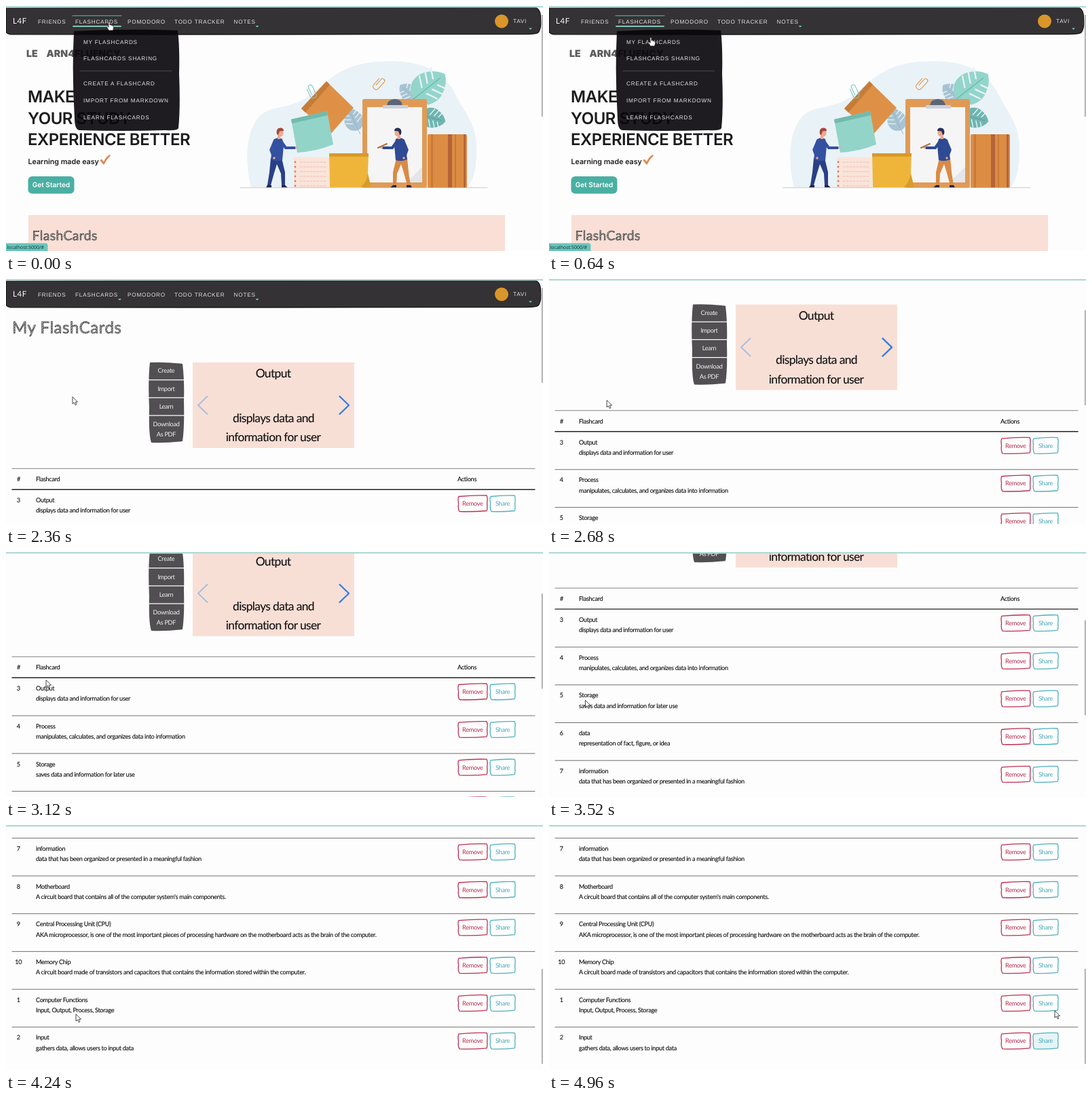
These frames come from a looping animation (791 by 361 pixels, 5 s). An HTML page:

```html
<!DOCTYPE html>
<html lang="en">
<head>
<meta charset="utf-8">
<title>Flashcards</title>
<style>
html, body { margin: 0; width: 100%; height: 100%; overflow: hidden; background: #fefdfd; }
svg { display: block; width: 791px; height: 361px; text-rendering: geometricPrecision; }
.nav { font: 8.2px "Liberation Sans", Arial, sans-serif; letter-spacing: .8px; fill: #e3e2e2; }
.hand { font: 9.2px Lato, sans-serif; letter-spacing: -.035em; fill: #111; stroke: #111; stroke-width: .12; }
.card { font-size: 17.4px; text-anchor: middle; }
.mid { text-anchor: middle; }
.light { fill: #f4f4f4; stroke: none; }
.sketch { font: 24px Lato, sans-serif; letter-spacing: .022em; fill: url(#hatch); stroke: #333; stroke-width: .55; }
.head { font: 600 24px Inter, sans-serif; letter-spacing: -.02em; fill: #1c1c1e; }
.logo { font: 900 14.2px Inter, sans-serif; fill: #5d5c5d; }
</style>
</head>
<body>
<svg id="stage" viewBox="0 0 791 361"></svg>
<script>
const LOOP = 5000, STEP = 40, ROW = 55.7, TABLE = 310.5;

const cards = [
  [3, 'Output', 'displays data and information for user'],
  [4, 'Process', 'manipulates, calculates, and organizes data into information'],
  [5, 'Storage', 'saves data and information for later use'],
  [6, 'data', 'representation of fact, figure, or idea'],
  [7, 'information', 'data that has been organized or presented in a meaningful fashion'],
  [8, 'Motherboard', "A circuit board that contains all of the computer system's main components."],
  [9, 'Central Processing Unit (CPU)', 'AKA microprocessor, is one of the most important pieces of processing hardware on the motherboard acts as the brain of the computer.'],
  [10, 'Memory Chip', 'A circuit board made of transistors and capacitors that contains the information stored within the computer.'],
  [1, 'Computer Functions', 'Input, Output, Process, Storage'],
  [2, 'Input', 'gathers data, allows users to input data']
];

const text = (x, y, s, cls, extra = '') => `<text x="${x}" y="${y}" class="${cls}" ${extra}>${s}</text>`;
const path = (d, fill, stroke = 'none', w = 1, extra = '') =>
  `<path d="${d}" fill="${fill}" stroke="${stroke}" stroke-width="${w}" stroke-linecap="round" stroke-linejoin="round" ${extra}/>`;
const line = (d, stroke, w = 1, extra) => path(d, 'none', stroke, w, extra);
const rect = (x, y, w, h, fill, extra = '') => `<rect x="${x}" y="${y}" width="${w}" height="${h}" fill="${fill}" ${extra}/>`;
const dot = (x, y, r, fill) => `<circle cx="${x}" cy="${y}" r="${r}" fill="${fill}"/>`;
const caret = (x, y) => path(`M${x - 2.5} ${y}h5l-2.5 2.4z`, '#63cfc2');

// Hand-drawn looking box: slightly uneven edges
function wobble(x, y, w, h, color, extra = '') {
  const d = `M${x + 1} ${y + 1.5}Q${x + w / 2} ${y - .6} ${x + w - 1} ${y}Q${x + w + .8} ${y + 3} ${x + w - .4} ${y + h / 2}` +
    `Q${x + w + .4} ${y + h - 3} ${x + w - 1} ${y + h - 1}Q${x + w / 2} ${y + h + .8} ${x + 2} ${y + h}` +
    `Q${x - .6} ${y + h - 4} ${x + .6} ${y + h / 2}Q${x - .8} ${y + 4} ${x + 1} ${y + 1.5}z`;
  return path(d, 'none', color, 1.3, extra);
}

function navbar(open) {
  const items = [[47, 'FRIENDS'], [102, 'FLASHCARDS'], [179, 'POMODORO'], [248, 'TODO TRACKER'], [335.5, 'NOTES']];
  return path('M0 3Q400 1.5 781 2.5Q788 6 787.5 18Q789 33 784 39Q781 42 760 41.5Q400 43 10 42Q2 42 0 38z', '#343234', '#161516', 1.2) +
    text(10, 26.2, 'L4F', 'nav', 'style="font:11.5px Lato,sans-serif;letter-spacing:.6px;fill:#fff"') +
    items.map(([x, s]) => text(x, 25.6, s, 'nav')).join('') +
    text(747, 25.1, 'TAVI', 'nav') + dot(730, 22.5, 10, '#d9962a') +
    (open ? line('M98 14.3H170', '#5fb9ae', 1) + line('M99 29.8H169', '#8ed9cf', 1.8) : caret(167.5, 29)) +
    caret(370, 29) + caret(772.5, 32.5);
}

function leaf(x, y, turn, size, fill, vein) {
  const ribs = [-7, 0, 7].map(v => `M4 ${v - 2}L14 ${v - 7}M-4 ${v - 2}L-14 ${v - 7}`).join('');
  return `<g transform="translate(${x} ${y}) rotate(${turn}) scale(${size})">` +
    path('M0 18C-14 17-18 4-14-6Q-9-17 0-21Q9-17 14-6C18 4 14 17 0 18z', fill) +
    line('M0 25V-15', vein, .8) + line(ribs, '#e9f2f7', 1.5) + '</g>';
}

function clip(x, y, turn, color) {
  return `<g transform="translate(${x} ${y}) rotate(${turn})">` +
    line('M-2 5V-6Q-2-9 1-9Q4-9 4-6V7Q4 11 0 11Q-5 11-5 7V-5', color, 1.1) + '</g>';
}

function man(x, flip, hair, legs, shirt) {
  return `<g transform="translate(${x} 0) scale(${flip} 1)">` +
    path('M-13 224L-15 245L-18 264H-13L-8 246L-4 233L2 247L3 264H8L8 245L3 224z', legs) +
    path('M-18 264H-12V267.5H-20zM3 264H8L12 267.5H3z', '#1c2650') +
    path('M-9 197Q-3 192 4 196L6 206L4 227Q-4 230-13 226z', shirt) +
    line('M2 199L9 209L22 209', shirt, 4) + line('M-8 200L-13 212L-9 223', shirt, 3.6) +
    dot(25, 208.5, 1.8, '#eeaa90') + dot(-8, 224, 1.7, '#eeaa90') +
    path('M-3 186Q-3 181.5 2 181.5Q6 182 5.5 187Q5.5 192 1.5 192L1 196H-3z', '#eeaa90') +
    path('M-4 189Q-6 180 1 179.5Q6 179.5 6 184L0 184.5L-2 190z', hair) + '</g>';
}

function art() {
  let s = path('M361 267C352 235 352 185 373 163C390 145 420 153 447 132C477 108 493 86 548 82C604 78 640 91 660 126C675 158 693 171 693 210C693 238 690 255 680 267z', '#e9f2f7');
  s += leaf(512, 168, -25, .9, '#a8c4d3', '#8fb0c2') + leaf(594, 128, -50, .85, '#a8c4d3', '#8fb0c2');
  s += leaf(622, 120, 52, 1.5, '#93d5ca', '#62b5a9') + leaf(628, 165, 105, .95, '#6fb5b0', '#549d98');
  s += path('M472 111L512 150L477 190L435 151z', '#de9146') + path('M472 111L477 116L441 157L435 151z', '#c67c39');
  s += path('M420 167L473 155L482 204Q458 214 429 216z', '#93d4c8') + path('M420 167L473 155L474 161L421 173z', '#71bbae');
  s += clip(450, 125, -25, '#76c7bb') + clip(550, 114, 42, '#e19750');
  s += rect(525, 137, 95, 131, '#e09a55', 'rx="3"') + rect(532, 149, 81, 111, '#f5f5f5');
  s += path('M590 260L613 237V260z', '#e3e6ea') + path('M555 151V146H592V151z', '#c9d2dc') + path('M561 146Q562 138 573 137Q583 138 584 146z', '#5b6478');
  s += rect(621, 189, 58, 79, '#dc8d43', 'rx="2"') + rect(626, 189, 3, 79, '#c97a38') + rect(651, 189, 6, 79, '#b5633a') + rect(661, 189, 2, 79, '#c97a38') + rect(674, 189, 3, 79, '#b5633a');
  s += rect(424, 223, 52, 45, '#fae4da');
  for (let y = 230; y < 266; y += 7) s += line(`M433 ${y}H471`, '#f0bfae', 1, 'stroke-dasharray="3 2"') + dot(426, y, 1.4, '#d87a63');
  s += path('M476 217H534L533 245Q533 260 538 267H477z', '#efb53b') + path('M476 217H534V222H476z', '#d89a2c') + path('M522 267Q531 260 533 247L538 267z', '#d99b2c');
  s += man(403, 1, '#a8453c', '#2b3f86', '#3450a0') + man(578, -1, '#263258', '#d98a45', '#2f4a94');
  return s + line('M548 209L561 203', '#b96f32', 2) + line('M345 267.7H709', '#b9bcc2', .8);
}

function home() {
  const menu = [[55.6, 'MY FLASHCARDS'], [80.4, 'FLASHCARDS SHARING'], [116.8, 'CREATE A FLASHCARD'], [142, 'IMPORT FROM MARKDOWN'], [166.6, 'LEARN FLASHCARDS']];
  return text(30, 74.5, 'LE', 'logo') + text(59.5, 74.5, 'ARN4FLUENCY', 'logo') +
    text(32, 142, 'MAKE', 'head') + text(32, 173.5, 'YOUR STUDY', 'head') + text(32, 205, 'EXPERIENCE BETTER', 'head') +
    text(32.5, 232.5, 'Learning made easy', 'head', 'style="font-size:10.7px;letter-spacing:0"') +
    path('M138.5 227.5L140.5 225.5L144 229.5Q147 222 153 219L154 220.5Q148 226 144.6 233.5L143.4 233.5z', '#dd8850') +
    rect(32.5, 251, 68, 25.5, '#4aafa3', 'rx="6"') +
    text(66.5, 267.3, 'Get Started', 'head mid', 'style="font-size:10.1px;letter-spacing:0;fill:#fff"') +
    art() + rect(33, 308, 702, 60, '#f9dfd6') +
    text(38.5, 345, 'FlashCards', 'sketch', 'style="font-size:19.3px"') + navbar(true) +
    path('M100 37Q180 33 253 36Q256 60 255 100Q257 150 254 180Q252 184 235 183Q170 185 108 183Q101 182 101 165Q97 100 100 37z', 'rgba(8,6,10,.91)') +
    line('M109 95.8H244', '#5a585b', .8) + menu.map(([y, s]) => text(114, y, s, 'nav')).join('') +
    path('M0 349.5H58Q61.5 349.5 61.5 353V361H0z', '#69c5ba') +
    text(1.5, 358.3, 'localhost:5000/#', '', 'style="font:7px Noto Sans,sans-serif;fill:#173b3a"');
}

function row([n, name, info], i) {
  const y = TABLE + ROW * i, last = i === cards.length - 1;
  const color = (c, id) => `style="fill:${c};stroke:none" ${id}`;
  return (i ? line(`M9 ${y}H779`, '#707070', 1) : '') +
    text(18.2, y + 18.6, n, 'hand mid') + text(44, y + 18.6, name, 'hand') + text(44, y + 33.8, info, 'hand') +
    wobble(666, y + 8.5, 43, 23.5, '#bb3151') + text(687.3, y + 23.6, 'Remove', 'hand mid', color('#b52f4e', '')) +
    (last ? rect(713.5, y + 9, 36, 23, '#17a2b8', 'id="tint" opacity="0"') : '') +
    wobble(713, y + 8.5, 37, 23.5, '#4cb1c0') + text(731.5, y + 23.6, 'Share', 'hand mid', color('#45a9b8', last ? 'id="share"' : ''));
}

function deck() {
  const labels = [[138.4, 'Create'], [164.6, 'Import'], [190.8, 'Learn'], [217, 'Download'], [232, 'As PDF']];
  return navbar(false) + text(9, 80.3, 'My FlashCards', 'sketch') +
    path('M212 123Q235 122 260 125Q263 150 262 180Q263 220 260 239Q238 242 214 241Q210 230 211 190Q209 150 212 123z', '#514f51') +
    line('M209 148.6H263M209 174.9H263M209 201.1H263', '#fefdfd', 1.3) +
    labels.map(([y, s]) => text(236, y, s, 'hand mid light')).join('') +
    rect(275, 123, 238, 126, '#f8dfd6') +
    text(393.5, 145.4, 'Output', 'hand card') + text(394, 210.7, 'displays data and', 'hand card') + text(393.5, 239, 'information for user', 'hand card') +
    '<g id="arrows">' + line('M296.5 173L283 186L296.5 199', '#a9bede', 2) + line('M491.5 173L505 186L491.5 199', '#3380df', 2.4) + '</g>' +
    line('M9 279.3H779', '#777', .9) + line(`M9 ${TABLE - .3}H779`, '#222', 1.4) +
    text(18.5, 298, '#', 'hand mid') + text(44, 298, 'Flashcard', 'hand') + text(665, 298, 'Actions', 'hand') +
    cards.map(row).join('');
}

const pointers = {
  arrow: path('M0 0V10L2.4 7.9L4.2 11.7L5.9 10.9L4.2 7.2H7.2z', '#fff', '#333', .9),
  hand: path('M-1 1Q0-1 1 1V5Q3 4 3.4 5.6Q5 5 5.4 6.6Q7 6.4 6.7 9L5.5 13H-.5L-3.6 8Q-3 6.4-1 8z', '#fff', '#222', .8),
  beam: line('M-2-4Q0-4 0-2.5Q0-4 2-4M0-3V4M-2 5Q0 5 0 3.5Q0 5 2 5', '#222', 1)
};

const stage = document.getElementById('stage');
stage.innerHTML = '<defs><pattern id="hatch" width="2.2" height="2.2" patternUnits="userSpaceOnUse" patternTransform="rotate(35)">' +
  rect(0, 0, 2.2, 2.2, '#d5d5d5') + rect(0, 0, 1.1, 2.2, '#444') + '</pattern></defs>' +
  rect(0, 0, 791, 361, '#fefdfd') + `<g id="home">${home()}</g><g id="deck">${deck()}</g>` +
  rect(0, 0, 791, 2.4, '#b4dcd9') + rect(788.7, 13, 2.3, 140, '#b9b9bb', 'id="bar"') +
  '<g id="cursor">' + Object.entries(pointers).map(([k, v]) => `<g id="${k}">${v}</g>`).join('') + '</g>';

const el = id => document.getElementById(id);
const show = (id, on) => el(id).setAttribute('display', on ? 'inline' : 'none');
const clamp = v => Math.max(0, Math.min(1, v));
const ease = v => v * v * (3 - 2 * v);

// Each key is [time, ...values]
function track(keys, t) {
  const i = keys.findIndex(k => k[0] > t);
  if (i < 0) return keys[keys.length - 1].slice(1);
  if (!i) return keys[0].slice(1);
  const a = keys[i - 1], b = keys[i], f = ease((t - a[0]) / (b[0] - a[0]));
  return a.slice(1).map((v, j) => v + (b[j + 1] - v) * f);
}

const moves = [[0, 152, 23], [400, 150, 46], [1240, 150, 46], [2240, 98, 174], [2480, 98, 174], [3000, 59, 189],
  [3240, 59, 189], [3640, 52, 227], [3960, 52, 227], [4200, 103, 279], [4360, 103, 279], [4680, 728, 314], [4800, 734, 316], [4960, 745, 274]];
const scrolls = [[2480, 0], [2800, 125], [3400, 125], [3720, 444.5], [3960, 444.5], [4120, 514]];

function draw(t) {
  const onHome = t < 720;
  const [x, y] = track(moves, t);
  const [scroll] = track(scrolls, t);
  const kind = onHome || (t >= 4660 && t < 4850) ? 'hand' : t >= 3680 && t < 4000 ? 'beam' : 'arrow';
  const hover = Math.min(clamp((t - 4640) / 150), clamp((4975 - t) / 150));
  show('home', onHome);
  show('deck', !onHome);
  show('arrows', t >= 1240);
  Object.keys(pointers).forEach(k => show(k, k === kind));
  el('deck').setAttribute('transform', `translate(0 ${-scroll})`);
  el('bar').setAttribute('y', 13 + scroll * .387);
  el('bar').setAttribute('height', onHome ? 150 : 140);
  el('cursor').setAttribute('transform', `translate(${x} ${y})`);
  el('tint').setAttribute('opacity', hover);
  el('share').style.fill = hover > .5 ? '#fff' : '#45a9b8';
}

function tick(now) {
  draw(Math.floor(now % LOOP / STEP) * STEP);
  requestAnimationFrame(tick);
}
draw(0);
requestAnimationFrame(tick);
</script>
</body>
</html>
```
